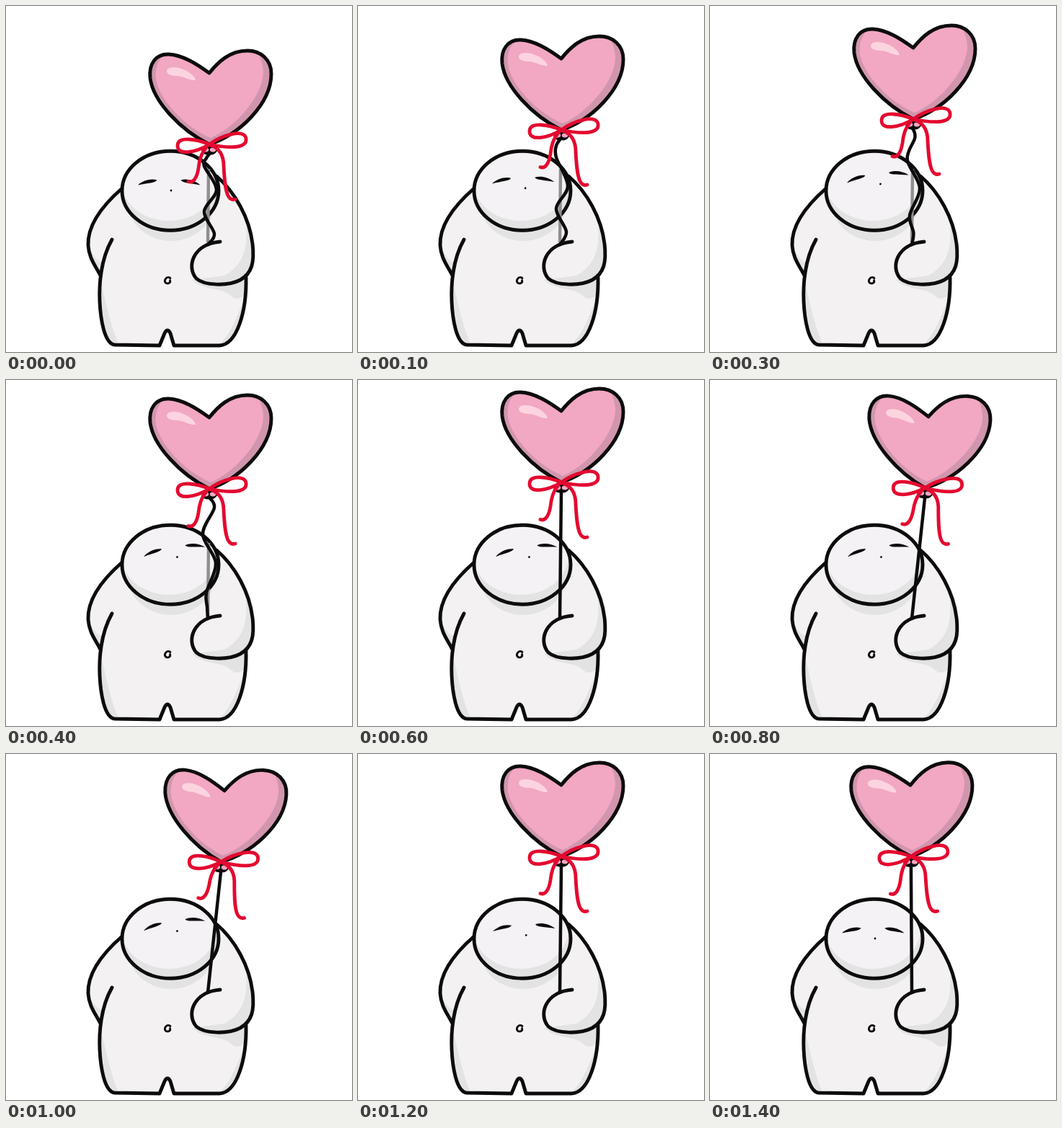
Recreate the animation shown at these times as an HTML page. Size 480 px wide and 480 px high, loop 1500 ms.

```html
<!DOCTYPE html>
<html lang="en">
<head>
<meta charset="utf-8">
<title>Heart balloon</title>
<style>
  html, body { margin: 0; width: 100%; height: 100%; overflow: hidden; background: #fff; }
  svg { display: block; width: 100vw; height: 100vh; }
  .line { fill: none; stroke: #0c0c0c; stroke-width: 4.9; stroke-linecap: round; stroke-linejoin: round; }
  .shade { fill: #e4e3e4; }
  .ribbon { fill: none; stroke: #e4092f; stroke-width: 4.8; stroke-linecap: round; stroke-linejoin: round; }
</style>
</head>
<body>
<svg viewBox="0 0 480 480">
  <defs>
    <path id="bodyShape" d="M161 253 C130 280 113 306 114 332 C115 350 124 360 131 374 C128 400 130 430 136 451 C139 463 143 470 152 470 L213 471 L220 454 Q224 446 228 454 L233 471 L296 471 C320 470 334 425 333 374 C343 366 344 350 342 330 C338 295 318 258 292 236 Z"/>
    <ellipse id="headShape" cx="228" cy="256.3" rx="67" ry="55"/>
    <path id="heartShape" d="M282 43 C264 30 245 18 226 17 C208 16 198 30 200 50 C204 82 242 122 282 142 C322 130 368 86 368 44 C368 24 353 12 335 12 C310 12 294 28 282 43 Z"/>
    <clipPath id="inBody"><use href="#bodyShape"/></clipPath>
    <clipPath id="inHead"><use href="#headShape"/></clipPath>
    <clipPath id="inHeart"><use href="#heartShape"/></clipPath>
  </defs>

  <use href="#bodyShape" fill="#f4f1f3"/>
  <g class="shade" clip-path="url(#inBody)">
    <ellipse cx="229" cy="270" rx="61" ry="56"/>
    <path d="M110 322 C118 345 126 354 136 357 L132 378 Z"/>
    <path d="M126 370 C137 390 139 430 158 474 L126 474 Z"/>
    <path d="M330 280 C337 325 338 362 290 380 L300 388 L345 390 L350 300 Z"/>
    <path d="M258 380 C275 396 300 390 312 402 C320 410 328 404 335 398 L333 370 Z"/>
    <path d="M336 398 C322 420 318 450 292 474 L340 474 Z"/>
  </g>
  <g class="line">
    <path d="M161 253 C130 280 113 306 114 332 C115 350 124 360 131 374"/>
    <path d="M147 324 C131 352 129 388 130 410 C131 432 136 469 151 470 L213 471 L220 454 Q224 446 228 454 L233 471 L296 471 C320 470 334 425 333 376"/>
    <path d="M292 236 C318 258 338 295 342 330 C345 356 341 371 325 380 C308 389 275 388 264 378 C250 362 259 330 297 327"/>
    <path d="M228 377.5 C223 374 219 380 221 383.5 C224 386.5 229 384 227.5 380.5" stroke-width="2.8" style="stroke-width:2.8"/>
  </g>

  <use href="#headShape" class="shade"/>
  <ellipse cx="226" cy="243" rx="66" ry="55" fill="#f4f2f4" clip-path="url(#inHead)"/>
  <use href="#headShape" class="line"/>

  <g id="face" fill="#0c0c0c">
    <path d="M183 248.5 C190 242 201 239 209.5 241.5 C208 245.5 196 245.5 183 248.5 Z"/>
    <path d="M269.5 248.5 C262 242 251 239 242.5 241.5 C244 245.5 256 245.5 269.5 248.5 Z"/>
    <circle cx="229" cy="256" r="1.4"/>
  </g>

  <path id="shadow" d="M281 226 L280 328" fill="none" stroke="#8f8f8f" stroke-width="4.4"/>
  <path id="string" class="line" style="stroke-width:4.5"/>

  <g id="balloon">
    <use href="#heartShape" fill="#d196ad"/>
    <g clip-path="url(#inHeart)">
      <path fill="#f2a7c2" d="M282 43 C268 24 250 8 232 10 C212 18 206 34 208 52 C213 80 248 118 284 133 C320 118 358 72 357 40 C356 26 350 14 344 6 C310 8 294 28 282 43 Z"/>
      <path fill="#fbd4e0" d="M223 41 C222 34 236 33 246 38 C256 42 262 48 263 53 C256 54 247 48 238 47 C230 47 224 45 223 41 Z"/>
    </g>
    <use href="#heartShape" class="line"/>
    <path d="M276 144 L271 151 Q275 158 282 156 Q289 158 293 151 L288 144 Z" fill="#0c0c0c"/>
    <ellipse cx="277" cy="149.5" rx="4.2" ry="3" fill="#f2a7c2"/>
    <ellipse cx="287" cy="149.5" rx="4.2" ry="3" fill="#f2a7c2"/>
    <g class="ribbon">
      <path d="M282 142 C266 135 239 130 238 143 C237 158 262 154 282 142 Z"/>
      <path d="M282 142 C298 130 331 119 333 134 C335 149 306 147 282 142 Z"/>
      <path d="M280 143 C270 155 268 165 267 175 C265 188 260 196 253 193.5"/>
      <path d="M284 143 C298 148 302 160 302 172 C303 190 304 205 308 213 C311 219 315 219 318 218"/>
    </g>
  </g>
</svg>
<script>
  const STEP = 100, LOOP = 1500;
  const el = id => document.getElementById(id);

  // One entry per step: drop of the balloon, and how far the face looks up.
  const drop = [50, 30, 22, 15, 9, 4];
  const gaze = [0, 0.42, 0.7, 0.9, 1, 1, 1, 1, 1, 1, 1, 0.8, 0.55, 0.25, 0];

  // String poses from neck to hand.
  const curled = [[283, 204], [278, 211], [275, 222], [292, 255], [275, 285], [289, 316], [280, 331]];
  const slack = [[281, 184], [275, 194], [275, 210], [291, 250], [275, 281], [289, 313], [280, 331]];
  const loose = [[281, 162], [289, 177], [273, 214], [291, 254], [278, 295], [279, 315], [280, 331]];

  const mix = (a, b, k) => a.map((p, i) => p.map((v, j) => v + (b[i][j] - v) * k));
  const straight = (x, y) => loose.map((_, i) => [x + (280 - x) * i / 6, y + (331 - y) * i / 6]);

  function smooth(pts) {
    let d = `M${pts[0]}`;
    for (let i = 0; i < pts.length - 1; i++) {
      const a = pts[i], b = pts[i + 1];
      const before = pts[i - 1] || a, after = pts[i + 2] || b;
      const c1 = a.map((v, j) => v + (b[j] - before[j]) / 6);
      const c2 = b.map((v, j) => v - (after[j] - a[j]) / 6);
      d += `C${c1} ${c2} ${b}`;
    }
    return d;
  }

  function stringPose(n, dx, dy) {
    if (n === 0) return curled;
    if (n <= 4) return mix(slack, loose, (n - 1) / 3);
    const taut = straight(282 + dx, 154 + dy);
    return n === 5 ? mix(loose, taut, 0.5) : taut;
  }

  function swayAt(n) {
    if (n <= 6) return 0;
    return n <= 12 ? 24 * Math.sin(Math.PI * (n - 6) / 6) : -4 * Math.sin(Math.PI * (n - 12) / 4);
  }

  function draw(n) {
    const sway = swayAt(n);
    const dx = sway * 0.78;
    const dy = (drop[n] || 0) + 7.5 * (sway / 20.5) ** 2;
    el('balloon').setAttribute('transform', `translate(${dx} ${dy}) rotate(${sway * 0.134} 282 143)`);
    el('string').setAttribute('d', smooth(stringPose(n, dx, dy)));
    el('shadow').setAttribute('visibility', n < 6 ? 'visible' : 'hidden');
    const g = gaze[n];
    el('face').setAttribute('transform',
      `translate(${6.7 * g} ${-9.8 * g ** 1.3}) rotate(${-9 * g * g} 226 244.5)`);
  }

  const start = performance.now();
  let shown = -1;
  function tick() {
    const n = Math.floor((performance.now() - start) % LOOP / STEP);
    if (n !== shown) draw(shown = n);
    requestAnimationFrame(tick);
  }
  tick();
</script>
</body>
</html>
```
